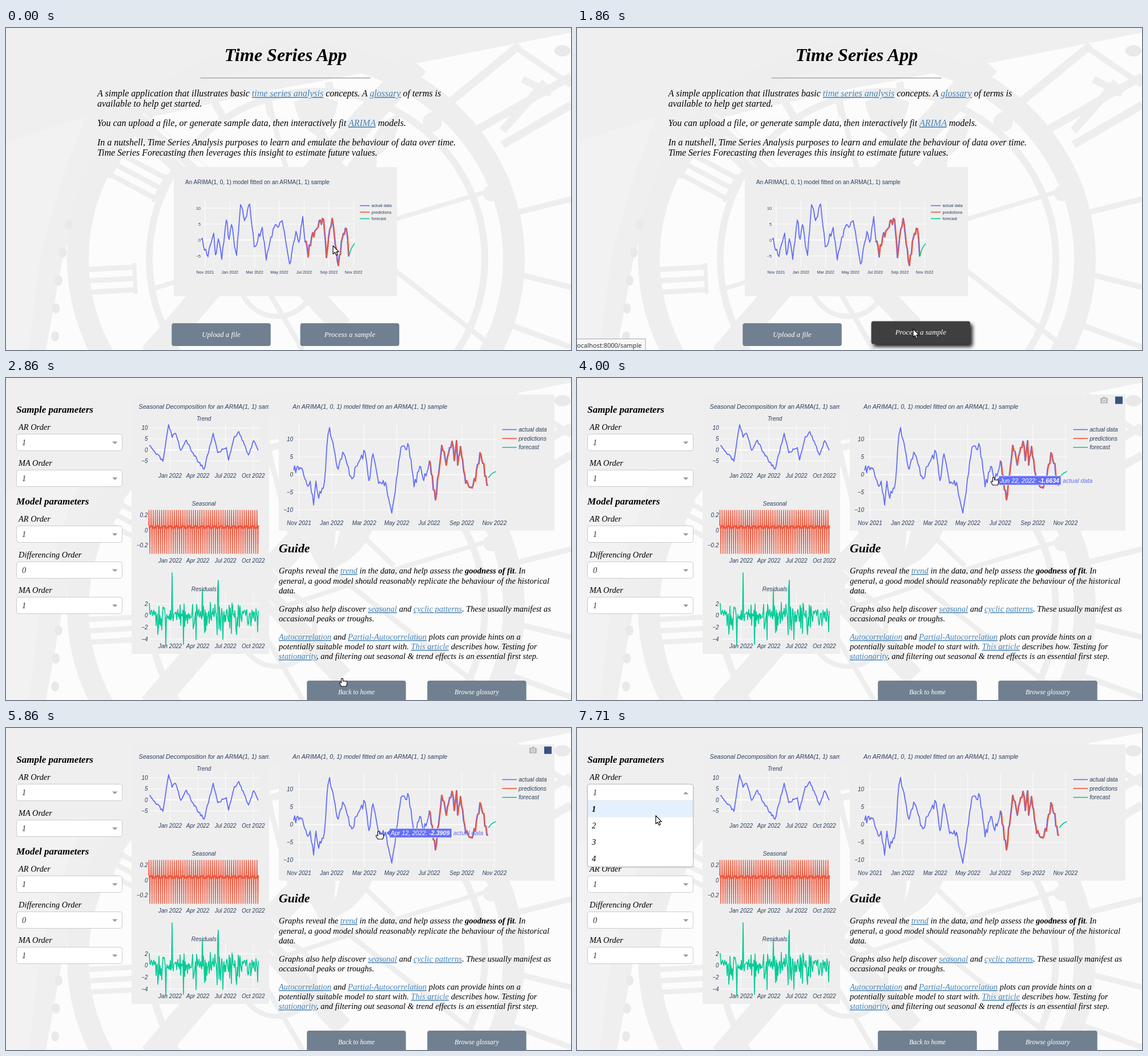
Write an HTML page that moves like this. It is 990x565 px and loops after 8000 ms.

```html
<!DOCTYPE html>
<html lang="en">
<head>
<meta charset="utf-8">
<title>Time Series App</title>
<style>
html, body { margin: 0; width: 100%; height: 100%; overflow: hidden; background: #fcfcfc; }
svg { display: block; width: 990px; height: 565px; }
text { white-space: pre; }
.serif { font-family: "Liberation Serif", serif; font-style: italic; }
.sans { font-family: "Liberation Sans", sans-serif; fill: #2a3f5f; }
.slant { font-style: italic; }
.status { font-family: "Noto Sans", sans-serif; fill: #333; }
.bold { font-weight: bold; }
.link { fill: #4682b4; text-decoration: underline; }
.mid { text-anchor: middle; }
.end { text-anchor: end; }
.white { fill: #fff; }
.dark { fill: #333; }
.blue { fill: #636efa; }
.hide { display: none; }
</style>
</head>
<body>
<svg id="stage" viewBox="0 0 990 565" xmlns="http://www.w3.org/2000/svg"></svg>
<script>
const BLUE = '#636efa', RED = '#EF553B', GREEN = '#00cc96', PANEL = '#eeeeee', SHADE = '#eeeeee';
const MONTHS = ['Nov 2021', 'Jan 2022', 'Mar 2022', 'May 2022', 'Jul 2022', 'Sep 2022', 'Nov 2022'];
const QUARTERS = ['Jan 2022', 'Apr 2022', 'Jul 2022', 'Oct 2022'];
const MODEL_TITLE = 'An ARIMA(1, 0, 1) model fitted on an ARMA(1, 1) sample';

const $ = id => document.getElementById(id);
const lerp = (a, b, p) => a + (b - a) * p;
const range = n => [...Array(n).keys()];

function randomizer(seed) {
  return () => (seed = seed * 16807 % 2147483647) / 2147483647 - .5;
}

// [x] marks a link, *x* marks bold
const text = (x, y, str, size, cls) =>
  `<text x="${x}" y="${y}" font-size="${size}" class="${cls}">${str
    .replace(/\[(.+?)\]/g, '<tspan class="link">$1</tspan>')
    .replace(/\*(.+?)\*/g, '<tspan class="bold">$1</tspan>')}</text>`;
const rect = (x, y, w, h, fill, extra = '') =>
  `<rect x="${x}" y="${y}" width="${w}" height="${h}" fill="${fill}" ${extra}/>`;
const path = (d, stroke, width) =>
  `<path d="${d}" fill="none" stroke="${stroke}" stroke-width="${width}" stroke-linejoin="round"/>`;
const shape = (d, fill) => `<path d="${d}" fill="${fill}"/>`;
const ellipse = (x, y, rx, ry, fill, stroke = 'none', width = 0) =>
  `<ellipse cx="${x}" cy="${y}" rx="${rx}" ry="${ry}" fill="${fill}" stroke="${stroke}" stroke-width="${width}"/>`;
const group = (id, content) => `<g id="${id}">${content}</g>`;
const polyline = (points, color, width = 1.8) => path('M' + points.map(p => p.join(' ')).join('L'), color, width);
const shifted = (points, dx) => points.map(([x, y]) => [x + dx, y]);

function paragraphs(x, y, size, lineHeight, gap, blocks) {
  return blocks.map(lines => {
    const block = lines.map((s, i) => text(x, Math.round(y + i * lineHeight), s, size, 'serif')).join('');
    y += lines.length * lineHeight + gap;
    return block;
  }).join('');
}

// Joins turning points with small random steps
function wander(turns, jitter, seed) {
  const random = randomizer(seed);
  return turns.flatMap(([x, y], i) => {
    if (!i) return [[x, y]];
    const [px, py] = turns[i - 1], n = Math.max(1, Math.round((x - px) / 2));
    return range(n).map(k => {
      const p = (k + 1) / n;
      return [lerp(px, x, p), lerp(py, y, p) + (p < 1 ? random() * jitter : 0)];
    });
  });
}

function axes({ left, right, top, bottom, firstX, gapX, xs, firstY, gapY, ys, size, cls, labelY }) {
  const atX = i => firstX + i * gapX, atY = i => firstY + i * gapY;
  return path(xs.map((_, i) => `M${atX(i)} ${top}V${bottom}`).join('') +
      ys.map((_, i) => `M${left} ${atY(i)}H${right}`).join(''), '#fff', .9) +
    path(`M${left} ${atY(ys.indexOf('0'))}H${right}`, '#fff', 1.6) +
    xs.map((s, i) => text(atX(i), labelY, s, size, cls + ' mid')).join('') +
    ys.map((s, i) => text(left - 1.5, atY(i) + size * .36, s, size, cls + ' end')).join('');
}

function legend(x, y, gap, len, size, cls) {
  return [['actual data', BLUE], ['predictions', RED], ['forecast', GREEN]].map(([name, color], i) =>
    path(`M${x} ${y + i * gap}h${len}`, color, 1.6) +
    text(x + len + 3.2, y + i * gap + size * .36, name, size, cls)).join('');
}

const button = (x, y, label, size) =>
  rect(x, y, 173.5, 40, '#708090', 'rx="4"') + text(x + 86.7, y + 24, label, size, 'serif white mid');

function backdrop() {
  const beam = (d, width) => path(d, SHADE, width);
  const numeral = (x, y, angle) => `<g transform="translate(${x} ${y}) rotate(${angle})">
    ${beam('M0 0H88M0 20H88M0 40H88', 9)}${beam('M0-7V47M88-7V47', 7)}</g>`;
  const bolts = range(5).map(i => ellipse(86 + 1.5 * i * i, 541 - 49 * i, 7, 9, '#e9e9e9')).join('');
  return rect(0, 0, 990, 565, '#fcfcfc') +
    shape('M0 0H990V8L740 58 450 112 240 160 150 260 100 400 70 565H0Z', '#efefef') +
    shape('M0 200L140 155 100 260 60 400 40 565H0Z', '#f2f2f2') +
    ellipse(508, 405, 382, 362, 'none', SHADE, 38) +
    ellipse(545, 405, 294, 294, 'none', SHADE, 12) +
    ellipse(475, 440, 66, 66, 'none', SHADE, 9) +
    beam('M720 62L410 395 255 575', 44) + beam('M225 165L430 355 590 525', 36) +
    path('M240 150L505 370M260 190L470 400', '#f6f6f6', 4) +
    beam('M455 110L505 300M565 220L680 330M400 360L520 565M560 330L860 565', 9) +
    beam('M850 285L700 330 490 400M250 460L440 400', 8) +
    beam('M900 30L735 165M990 85L805 190M990 135L870 205M945 95L870 180', 14) +
    beam('M895 35L990 100M870 330L990 300M890 430L990 455M880 520L990 560', 10) +
    beam('M365 130L385 165M455 110L465 155M565 95L570 120M690 110L650 150M905 90L955 115', 13) +
    shape('M505 130Q540 110 582 130 575 165 558 180 585 220 575 300L555 345 530 300Q525 230 545 190 510 170 505 130Z', SHADE) +
    shape('M690 150Q650 165 640 205 590 230 580 290L555 345 600 320Q650 280 650 225 690 200 690 150Z', SHADE) +
    ellipse(435, 355, 36, 36, SHADE) + ellipse(747, 165, 17, 17, SHADE) +
    ellipse(850, 290, 14, 14, SHADE) + ellipse(975, 40, 14, 10, '#e9e9e9') +
    numeral(202, 222, 28) + numeral(137, 424, -3) + bolts;
}

function homeChart() {
  const actual = wander([[342, 371], [354, 401], [364, 360], [367, 398], [372, 370], [378, 406], [386, 337], [391, 371],
    [395, 345], [404, 399], [411, 310], [418, 338], [427, 309], [435, 384], [449, 350], [456, 407], [468, 353],
    [484, 338], [497, 414], [508, 357], [513, 376], [520, 331], [524, 376]], 14, 5);
  const fitted = wander([[524, 376], [530, 402], [536, 367], [557, 336], [562, 403], [572, 334], [583, 417],
    [590, 368], [597, 352], [601, 401]], 22, 8);
  return rect(294, 244, 391, 226.5, PANEL) + text(314, 273.5, MODEL_TITLE, 10.02, 'sans') +
    axes({ left: 342.5, right: 611, top: 304, bottom: 420, labelY: 431, size: 7.2, cls: 'sans',
      firstX: 349, gapX: 43.35, xs: MONTHS, firstY: 316, gapY: 28, ys: ['10', '5', '0', '−5'] }) +
    polyline(actual, BLUE) + polyline(shifted(fitted, -1), BLUE) + polyline(fitted, RED) +
    path('M601 401Q604 385 611 378', GREEN, 1.7) + legend(620, 311.7, 11.4, 17.3, 7.2, 'sans');
}

function home() {
  return text(490, 58, 'Time Series App', 32, 'serif bold mid') +
    rect(340.5, 87, 298, 1, '#9b9b9b') + rect(340.5, 88, 298, 1, '#dcdcdc') +
    paragraphs(160, 120, 16, 18, 16, [
      ['A simple application that illustrates basic [time series analysis] concepts. A [glossary] of terms is',
        'available to help get started.'],
      ['You can upload a file, or generate sample data, then interactively fit [ARIMA] models.'],
      ['In a nutshell, Time Series Analysis purposes to learn and emulate the behaviour of data over time.',
        'Time Series Forecasting then leverages this insight to estimate future values.']]) +
    homeChart() + button(290.3, 518, 'Upload a file', 12.8) +
    group('plain', button(515.6, 518, 'Process a sample', 12.8)) +
    group('raised', rect(515.6, 514.5, 173.5, 40, '#3f3f3f', 'rx="4" style="filter:drop-shadow(4px 5px 3px #222)"') +
      text(602.3, 538.3, 'Process a sample', 12.8, 'serif white mid') +
      rect(-2, 545.5, 122, 22, '#f7f7f7', 'stroke="#aaa"') +
      text(-2.8, 560.5, 'localhost:8000/sample', 11, 'status'));
}

const select = (y, value) => rect(18.5, y + .5, 185, 29, '#fff', 'rx="3.5" stroke="#ccc"') +
  text(28, y + 20, value, 14.4, 'serif dark') + shape(`M186 ${y + 13.5}h9.4l-4.7 4.6z`, '#999');

function parameters(y, title, fields) {
  return text(18.3, y, title, 17, 'serif bold') + fields.map(([label, value], i) => {
    const base = Math.round(y + 30.4 + i * 62.5);
    return text(22, base, label, 14.4, 'serif') + select(base + 7, value);
  }).join('');
}

function guide() {
  return text(478, 306, 'Guide', 21.8, 'serif bold') +
    paragraphs(478, 343.4, 14.5, 17.3, 14.3, [
      ['Graphs reveal the [trend] in the data, and help assess the *goodness of fit*. In',
        'general, a good model should reasonably replicate the behaviour of the historical', 'data.'],
      ['Graphs also help discover [seasonal] and [cyclic patterns]. These usually manifest as',
        'occasional peaks or troughs.'],
      ['[Autocorrelation] and [Partial-Autocorrelation] plots can provide hints on a',
        'potentially suitable model to start with. [This article] describes how. Testing for',
        '[stationarity], and filtering out seasonal &amp; trend effects is an essential first step.']]) +
    button(527.2, 531, 'Back to home', 11.75) + button(738.2, 531, 'Browse glossary', 11.75);
}

function decomposition() {
  const trend = wander([[251, 119], [258, 127], [275, 146], [285, 82], [291, 104], [297, 97], [306, 127], [316, 109],
    [326, 130], [347, 160], [363, 97], [371, 131], [386, 122], [390, 144], [400, 103], [408, 94], [425, 135],
    [434, 110], [442, 127]], 5, 3);
  // Each week has one peak, one trough and quiet days
  const seasonal = range(365).map(i => [250 + i * .53, { 1: 232, 4: 308 }[i % 7] || 259 + i % 3 * 2.5]);
  const random = randomizer(11);
  const residuals = range(192).map(i => {
    const noise = random() + random() + random();
    return [251 + i, 416 + noise * 20 + noise ** 3 * 15];
  });
  const plot = (name, titleY, top, bottom, firstY, gapY, ys) =>
    text(346.7, titleY, name, 10, 'sans slant mid') +
    axes({ left: 250, right: 443.5, top, bottom, labelY: bottom + 12, firstX: 287.5, gapX: 48.6, xs: QUARTERS,
      firstY, gapY, ys, size: 10, cls: 'sans slant' });
  return rect(220, 29, 241, 455, PANEL) +
    `<g clip-path="url(#left)">${text(232.5, 53.5, 'Seasonal Decomposition for an ARMA(1, 1) sample', 10.7, 'sans slant')}</g>` +
    plot('Trend', 74.5, 78, 163, 87.5, 19.3, ['10', '5', '0', '−5']) + polyline(trend, BLUE) +
    plot('Seasonal', 223.5, 228, 312, 240.5, 26.5, ['0.2', '0', '−0.2']) + polyline(seasonal, RED, 1.4) +
    plot('Residuals', 374, 377, 461.5, 396, 20.7, ['2', '0', '−2', '−4']) + polyline(residuals, GREEN, 1.6);
}

function forecast() {
  const actual = wander([[504, 162], [515, 157], [520, 162], [529, 190], [533, 181], [539, 223], [543, 181], [548, 211],
    [558, 182], [564, 100], [567, 87], [573, 114], [582, 160], [590, 130], [606, 177], [617, 149], [629, 130],
    [636, 180], [643, 133], [653, 185], [665, 183], [676, 237], [692, 122], [706, 120], [715, 191], [725, 155],
    [732, 180], [742, 145]], 14, 7);
  const fitted = wander([[742, 145], [753, 214], [764, 118], [772, 153], [782, 111], [786, 145], [790, 110], [792, 153],
    [797, 120], [806, 185], [815, 191], [823, 181], [831, 131], [836, 150], [845, 188]], 16, 4);
  return rect(478, 29, 483, 239, PANEL) + text(502, 53.5, MODEL_TITLE, 10.74, 'sans slant') +
    axes({ left: 504.5, right: 859, top: 79, bottom: 245, labelY: 257.5, size: 10, cls: 'sans slant',
      firstX: 513.5, gapX: 57.05, xs: MONTHS, firstY: 107.5, gapY: 31, ys: ['10', '5', '0', '−5', '−10'] }) +
    polyline(actual, BLUE) + polyline(shifted(fitted, -1), BLUE) + polyline(fitted, RED, 1.9) +
    path('M845.5 175Q849 168 858.5 164', GREEN, 1.7) + legend(869.5, 90.5, 15.6, 25.5, 10.1, 'sans slant') +
    group('modebar', shape('M917 35h3l1.5-2h4l1.5 2h3v9.5h-13z', '#b9b9b9') +
      ellipse(923.5, 39.5, 2.6, 2.6, '#b9b9b9', PANEL, 1.4) + rect(943, 32.5, 13, 13, '#3b5280'));
}

const tooltip = group('tip', `<path d="M0 0L6-5V-8H115V8H6V5Z" fill="${BLUE}" stroke="#eee" stroke-width=".8"/>
  <text x="8" y="3.7" font-size="10.7" class="sans slant white"><tspan id="day"></tspan>: <tspan id="amount" class="bold"></tspan></text>` +
  text(118, 3.7, 'actual data', 10.7, 'sans slant blue'));

function menu() {
  return rect(18.5, 98.5, 185, 145, '#fff', 'rx="3.5" stroke="#bbb" style="filter:drop-shadow(0 1px 1px #0002)"') +
    path('M19 127.5H203', '#e3e3e3', 1) + text(28, 118, '1', 14.4, 'serif dark') +
    shape('M186 116.3h9.4l-4.7-4.6z', '#999') + rect(19, 128, 184, 28.7, '#e3f1fe', 'id="focus"') +
    range(4).map(i => text(26, 147 + i * 29, `${i + 1}`, 14.4, i ? 'serif' : 'serif bold')).join('');
}

const cursor = `<g id="cursor" stroke="#111" fill="#fff" stroke-linejoin="round" stroke-width="1.2">
  <path id="arrow" d="M0 0V14.5L3.4 11.5 5.7 16.8 8.1 15.7 5.9 10.6H10.2Z"/>
  <path id="hand" d="M-1.5 0Q0-1.8 1.5 0V4H7Q8.5 4 8.5 5.5V9.5L7 13H-1.5L-4.5 8Q-5 6-3.3 6L-1.5 7Z"/></g>`;

$('stage').innerHTML = '<clipPath id="left"><path d="M220 29h241v455h-241z"/></clipPath>' + backdrop() +
  group('home', home()) +
  group('app', parameters(61, 'Sample parameters', [['AR Order', '1'], ['MA Order', '1']]) +
    parameters(222, 'Model parameters', [['AR Order', '1'], ['Differencing Order', '0'], ['MA Order', '1']]) + guide()) +
  group('charts', decomposition() + forecast()) + tooltip + group('menu', menu()) + cursor;

const REFRESH = 1000 / 7;
const progress = (t, start, steps) =>
  Math.min(1, Math.max(0, Math.floor((t - start + 3) / REFRESH) + 1) / steps);

const strokes = [
  { start: 570, steps: 8, x: 589, y: 528 },
  { start: 3140, steps: 3, x: 685, y: 216 },
  { start: 4000, steps: 1, x: 730, y: 175 },
  { start: 5290, steps: 5, x: 653, y: 182 },
  { start: 6000, steps: 6, x: 150, y: 111 },
  { start: 7290, steps: 4, x: 134, y: 168 },
];
const pointer = t => strokes.reduce((at, { start, steps, x, y }) => {
  const p = progress(t, start, steps);
  return { x: lerp(at.x, x, p), y: lerp(at.y, y, p) };
}, { x: 573, y: 382 });

const show = (id, on) => $(id).classList.toggle('hide', !on);
const between = (t, a, b) => t >= a && t < b;

function inspect(p) {
  const day = Math.round(lerp(233, 162, p)), amount = lerp(-1.6634, -2.3909, p);
  $('tip').setAttribute('transform', `translate(${lerp(733, 666, p)} ${169.5 - 6.2 * amount})`);
  $('day').textContent = new Date(2021, 10, 1 + day)
    .toLocaleDateString('en-US', { month: 'short', day: '2-digit', year: 'numeric' });
  $('amount').textContent = amount.toFixed(4);
}

function draw() {
  const t = performance.now() % 8000;
  const { x, y } = pointer(t);
  const onHome = t < 2000, raised = onHome && y > 514, inspecting = between(t, 4000, 6000);
  const hand = between(t, 2000, 3140) || inspecting;
  show('home', onHome);
  show('plain', !raised);
  show('raised', raised);
  show('app', !onHome);
  show('charts', t >= 2860);
  show('modebar', between(t, 4000, 6430));
  show('menu', t >= 6860);
  show('tip', inspecting);
  show('arrow', !hand);
  show('hand', hand);
  inspect(progress(t, 5290, 5));
  $('focus').setAttribute('y', y < 157 ? 128 : 156.7);
  $('cursor').setAttribute('transform', `translate(${x} ${y})`);
  requestAnimationFrame(draw);
}
draw();
</script>
</body>
</html>
```
